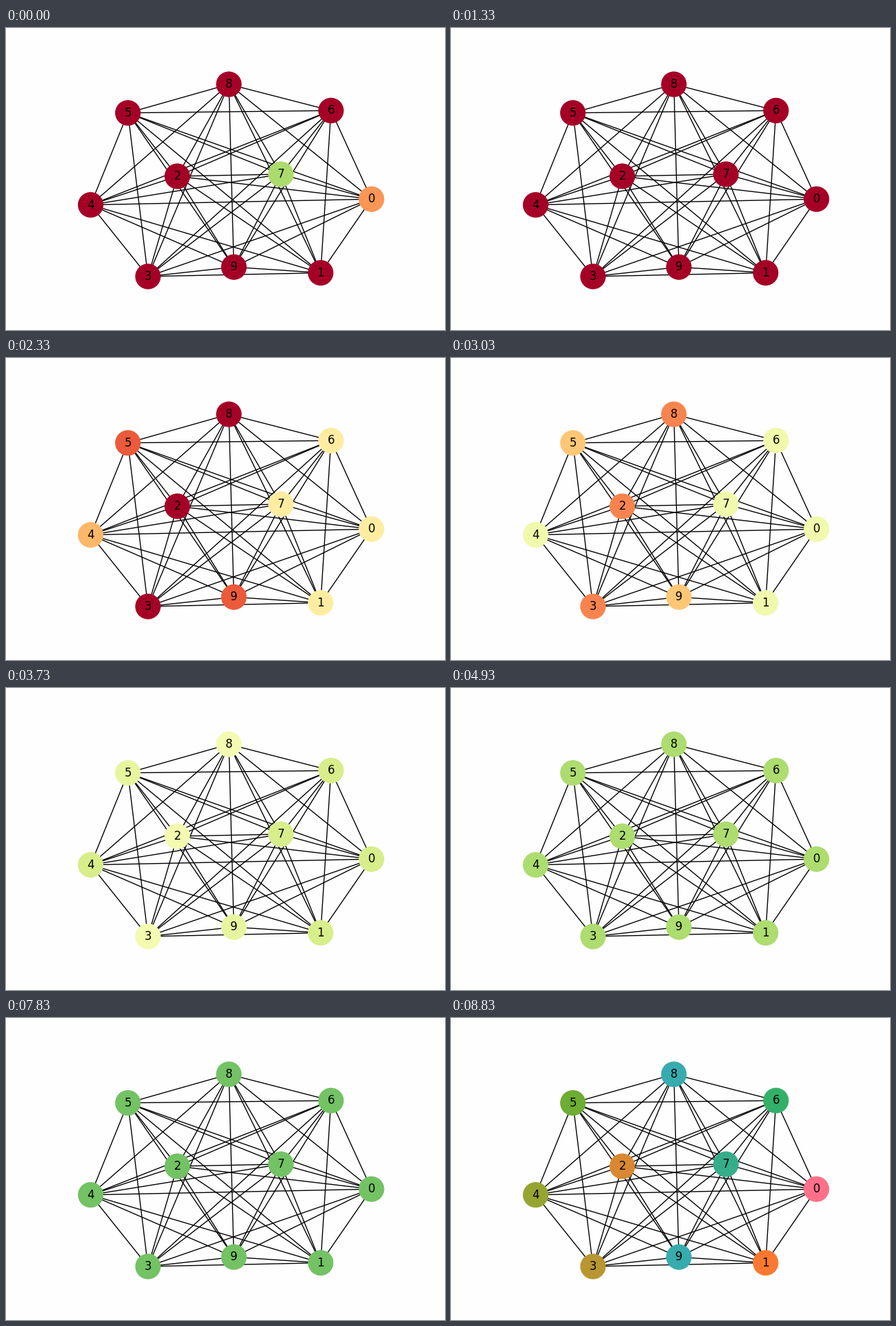
A matplotlib script that plays this animation: 640 px wide and 440 px high, repeating every 8.93 s.

```python
from itertools import combinations

import matplotlib.pyplot as plt
import numpy as np
from matplotlib.animation import FuncAnimation
from matplotlib.collections import LineCollection
from matplotlib.colors import LinearSegmentedColormap

WIDTH, HEIGHT, DPI = 640, 440, 100
INTERVAL, FRAMES = 19, 470
STEP, RUN_START, FINAL_STEP = 100, 1330, 75

NODES = np.array([
    (532.8, 249.3), (458.7, 356.7), (249.7, 216), (207, 362), (123.4, 257.7),
    (177.7, 123.7), (473.8, 120.3), (400.8, 213), (324.9, 82), (332.2, 348.3),
])
IDS = np.arange(len(NODES))

# Each node joins the shared learning curve over its own span of steps.
LEADERS, LATECOMERS = [0, 1, 6, 7], [2, 3, 8]
JOIN_START = np.where(np.isin(IDS, LATECOMERS), 10, 0)
JOIN_END = np.select([np.isin(IDS, LEADERS), IDS == 4], [10, 14], 26)

LEVEL_CMAP = plt.get_cmap("RdYlGn")
GROUP_CMAP = LinearSegmentedColormap.from_list("groups", [
    (0, "#fe7089"), (1 / 8, "#fb7830"), (4 / 8, "#97a431"),
    (5 / 8, "#6dad31"), (6 / 8, "#33b067"), (1, "#37abae"),
])


def levels(step):
    curve = 0.82 * (1 - np.exp(-(step + 9.5) / 25))
    joined = np.clip((step - JOIN_START) / (JOIN_END - JOIN_START), 0, 1)
    return curve * joined


def colors_at(ms):
    if ms < STEP:
        return LEVEL_CMAP(np.select([IDS == 0, IDS == 7], [0.265, 0.69], 0.0))
    step = max(0, (ms - RUN_START) // STEP)
    if step >= FINAL_STEP:
        return GROUP_CMAP(IDS / 8)
    return LEVEL_CMAP(levels(step))


plt.rcParams["font.family"] = "DejaVu Sans"
fig = plt.figure(figsize=(WIDTH / DPI, HEIGHT / DPI), dpi=DPI, facecolor="#fefefe")
ax = fig.add_axes([0, 0, 1, 1])
ax.set(xlim=(0, WIDTH), ylim=(HEIGHT, 0))
ax.axis("off")

ax.add_collection(LineCollection(list(combinations(NODES, 2)),
                                 colors="black", linewidths=1, zorder=1))
dots = ax.scatter(*NODES.T, s=640, c=colors_at(0), linewidths=1.5, zorder=2)
for label, (x, y) in enumerate(NODES):
    ax.text(x, y, str(label), size=12, ha="center", va="center", zorder=3)


def update(frame):
    colors = colors_at((frame + 1) * INTERVAL - 1)
    dots.set_facecolor(colors)
    dots.set_edgecolor(colors)
    return (dots,)


anim = FuncAnimation(fig, update, frames=FRAMES, interval=INTERVAL,
                     repeat=True, repeat_delay=0)
plt.show()
```
